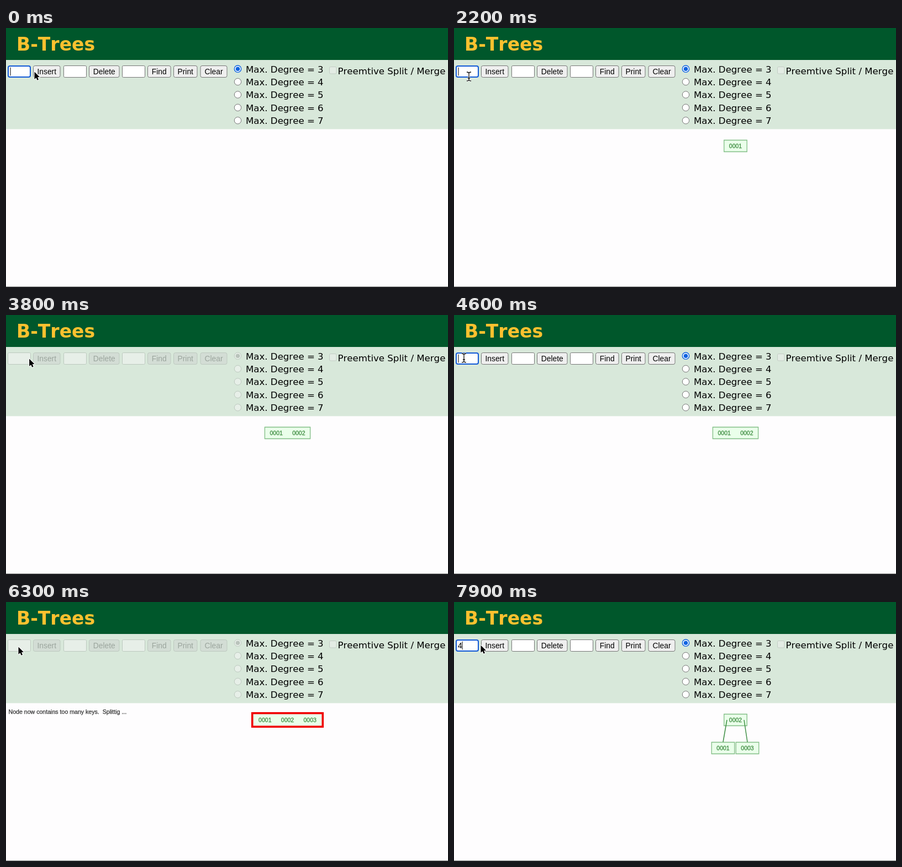
An HTML page with a canvas that plays this animation: 800 px wide and 470 px high, repeating every 8000 ms.

```html
<!DOCTYPE html>
<html lang="en">
<head>
<meta charset="utf-8">
<title>B-Trees</title>
<style>
  html, body { margin: 0; width: 100%; height: 100%; overflow: hidden; background: #fefdfe; }
  canvas { display: block; }
</style>
</head>
<body>
<canvas id="stage" width="800" height="470"></canvas>
<script>
const LOOP = 8000, STEP = 100;
const ctx = document.getElementById('stage').getContext('2d');
const VERDANA = 'Verdana, "DejaVu Sans", sans-serif';
const ARIAL = 'Arial, "Liberation Sans", sans-serif';

const BUTTONS = [['Insert', 49, 98.5], ['Delete', 150, 205.5], ['Find', 256, 298.5],
                 ['Print', 303, 346.5], ['Clear', 351.5, 400.5]];
const INPUTS = [3, 104, 210];

// Spans are [start, end) in ms
const BUSY = [[600, 1700], [2900, 4300], [5100, 7200]];
const FOCUS = [[0, 600], [2000, 2900], [4400, 5100], [7400, 8000]];
const RED = [[3400, 3800], [5500, 5900], [6100, 6600]];
const TYPED = [[200, 600, '1'], [2600, 2900, '2'], [4900, 5100, '3'], [7700, 8000, '4']];
const MESSAGES = [
  [600, 1200, 'Inserting 0001'],
  [2900, 3400, 'Inserting 0002'],
  [3400, 3800, 'Inserting 0002.  Inserting into a leaf'],
  [5100, 5500, 'Inserting 0003'],
  [5500, 6100, 'Inserting 0003.  Inserting into a leaf'],
  [6100, 6600, 'Node now contains too many keys.  Splittig ...']
];
const KEYS = [[1200, 3800, ['0001']], [3800, 5900, ['0001', '0002']],
              [5900, 6600, ['0001', '0002', '0003']]];

// Pointer path: time, x, y
const PATH = [[0, 51, 79], [500, 71, 73], [1400, 71, 73], [2100, 27, 88], [2500, 27, 88],
              [3100, 43, 79], [3700, 43, 79], [4400, 18, 78], [5200, 18, 78],
              [5800, 22, 81], [7200, 22, 81], [7900, 48, 78]];

const at = (spans, t) => spans.find(([a, b]) => t >= a && t < b);
const clamp = v => Math.max(0, Math.min(1, v));
const mix = (a, b, p) => a + (b - a) * p;
const smooth = p => p * p * (3 - 2 * p);

function rect(x, y, w, h, fill) {
  ctx.fillStyle = fill;
  ctx.fillRect(x, y, w, h);
}

function box(x, y, w, h, r, fill, line, width = 1) {
  ctx.beginPath();
  ctx.roundRect(x, y, w, h, r);
  ctx.fillStyle = fill;
  ctx.fill();
  ctx.strokeStyle = line;
  ctx.lineWidth = width;
  ctx.stroke();
}

function disc(x, y, r, fill, line, width = 1) {
  ctx.beginPath();
  ctx.arc(x, y, r, 0, 2 * Math.PI);
  ctx.fillStyle = fill;
  ctx.fill();
  if (!line) return;
  ctx.strokeStyle = line;
  ctx.lineWidth = width;
  ctx.stroke();
}

function text(s, x, y, font, color, align = 'left', weight = 0) {
  ctx.font = font;
  ctx.textAlign = align;
  ctx.fillStyle = ctx.strokeStyle = color;
  ctx.fillText(s, x, y);
  if (weight) {
    ctx.lineWidth = weight;
    ctx.strokeText(s, x, y);
  }
}

function controls(t) {
  const off = at(BUSY, t), focus = at(FOCUS, t);
  const typed = (at(TYPED, t) || [])[2] || '';
  const field = off ? '#e7efe8' : '#fff', edge = off ? '#bdc9bf' : '#767676';

  INPUTS.forEach((x, i) => {
    if (i === 0 && focus) box(x + 1, 69, 40, 20, 3, field, '#1159d6', 2);
    else box(x + .5, 68.5, 41, 21, 2, field, edge);
  });
  text(typed, 7, 84, '13.8px ' + ARIAL, '#000');
  if (focus) rect(typed ? 14.5 : 7.5, 71.5, 1, 15, '#000');

  for (const [name, left, right] of BUTTONS) {
    box(left + .5, 68.5, right - left - 1, 21, 3, off ? '#d3ddd5' : '#efefef', edge);
    text(name, (left + right) / 2, 84, '13.8px ' + ARIAL, off ? '#9ba59d' : '#000', 'center');
  }

  for (let i = 0; i < 5; i++) {
    const y = 74.2 + 23.4 * i;
    const on = i === 0;
    disc(419.5, y, 6.2, field, on && !off ? '#0d62e0' : edge, on && !off ? 1.4 : 1);
    if (on) disc(419.5, y, 3.8, off ? '#b9c3bb' : '#0d62e0');
    text('Max. Degree = ' + (i + 3), 434, y + 6.4, '16.6px ' + VERDANA, '#000');
  }
  box(585.5, 70.5, 12.5, 12.5, 2, '#e3ece4', '#c4cdc5');
  text('Preemtive Split / Merge', 600.5, 83.8, '16.6px ' + VERDANA, '#000');
}

function node(cx, cy, keys, glow) {
  const w = 42.5 + 40.7 * (keys.length - 1), x = cx - w / 2, y = cy - 11;
  if (glow) {
    rect(x - glow, y - glow + .5, w + 2 * glow, 21 + 2 * glow, '#f00000');
    rect(x, y + .5, w, 21, '#eaffea');
  } else {
    box(x + .5, y + .5, w - 1, 21, 0, '#eaffea', '#80bd84', 1.3);
  }
  keys.forEach((key, i) =>
    text(key, cx + 40.7 * (i - (keys.length - 1) / 2), cy + 4.2, '10.5px ' + ARIAL, '#3f8c42', 'center', .3));
}

function edge(x1, y1, x2, y2) {
  ctx.beginPath();
  ctx.moveTo(x1, y1);
  ctx.lineTo(x2, y2);
  ctx.strokeStyle = '#3f8f45';
  ctx.lineWidth = 1.5;
  ctx.stroke();
}

function tree(t) {
  const message = at(MESSAGES, t), single = at(KEYS, t);
  if (message) text(message[2], 4.5, 203, '10.6px ' + ARIAL, '#333', 'left', .25);
  if (single) {
    const pulse = Math.abs((t / 467 % 1) * 2 - 1);
    node(509.5, 214, single[2], at(RED, t) ? 3.6 + 1.2 * pulse : 0);
  } else if (t >= 6600) {
    const p = clamp((t - 6600) / 500);
    const left = mix(509.5, 487, p), right = mix(509.5, 531, p), y = mix(214, 265, p);
    node(left, y, ['0001']);
    node(right, y, ['0003']);
    node(509.5, 214, ['0002']);
    edge(494, 214, left, y - 11);
    edge(525, 214, right, y - 11);
  }
}

function outline(points, x, y) {
  ctx.beginPath();
  points.forEach(([dx, dy]) => ctx.lineTo(x + dx, y + dy));
  ctx.closePath();
  ctx.lineJoin = 'round';
  ctx.strokeStyle = '#fff';
  ctx.lineWidth = 2;
  ctx.stroke();
  ctx.fillStyle = '#000';
  ctx.fill();
  ctx.lineJoin = 'miter';
}

function beam(x, y) {
  for (const [color, width] of [['#fff', 3], ['#111', 1.3]]) {
    ctx.beginPath();
    for (const s of [-1, 1]) {
      ctx.moveTo(x - 4, y + 8 * s);
      ctx.quadraticCurveTo(x, y + 8 * s, x, y + 5.5 * s);
      ctx.quadraticCurveTo(x, y + 8 * s, x + 4, y + 8 * s);
    }
    ctx.moveTo(x, y - 6);
    ctx.lineTo(x, y + 6);
    ctx.moveTo(x - 2, y + 3);
    ctx.lineTo(x + 2, y + 3);
    ctx.strokeStyle = color;
    ctx.lineWidth = width;
    ctx.stroke();
  }
}

function pointer(t) {
  const i = Math.max(1, PATH.findIndex(k => k[0] >= t));
  const [t0, x0, y0] = PATH[i - 1], [t1, x1, y1] = PATH[i];
  const p = smooth(clamp((t - t0) / (t1 - t0)));
  const x = mix(x0, x1, p), y = mix(y0, y1, p);
  if (!at(BUSY, t) && x < 45 && y < 90) beam(x, y);
  else outline([[.5, .5], [.5, 14], [3.6, 11.2], [5.6, 15.8], [8, 14.8], [6, 10.2], [10, 10]], x, y);
}

function draw(now) {
  const t = Math.floor(now % LOOP / STEP) * STEP;
  rect(0, 0, 800, 470, '#fefdfe');
  rect(0, 0, 800, 58, '#00572b');
  rect(0, 58, 800, 125.5, '#d8e8da');
  rect(0, 469, 800, 1, '#8b8b8b');
  text('B-Trees', 19, 41, 'bold 33px ' + VERDANA, '#fdc12f');
  controls(t);
  tree(t);
  pointer(t);
}

ctx.fontKerning = 'none';
const start = performance.now();
function tick() {
  draw(performance.now() - start);
  requestAnimationFrame(tick);
}
tick();
</script>
</body>
</html>
```
